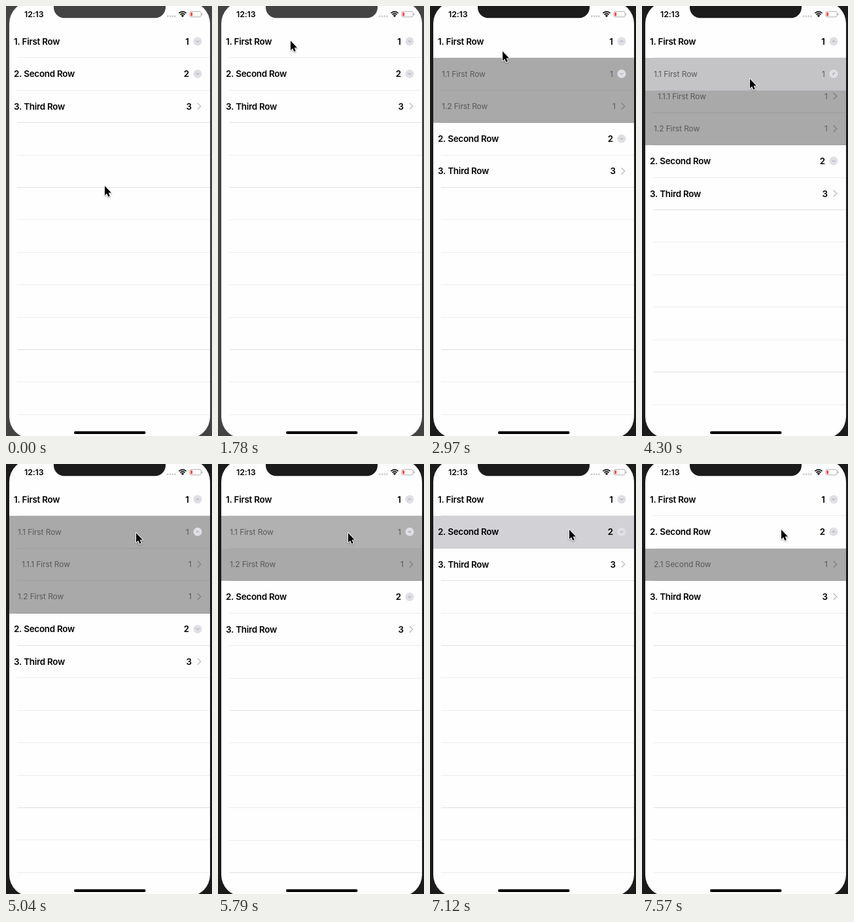
Recreate the animation shown at these times as an HTML page with a canvas. Size 315x655 px, loop 8 s.

```html
<!DOCTYPE html>
<html lang="en">
<head>
<meta charset="utf-8">
<title>Expandable rows</title>
<style>
  html, body { margin: 0; width: 100%; height: 100%; overflow: hidden; background: #1b1b1b; }
  canvas { display: block; width: 315px; height: 655px; }
</style>
</head>
<body>
<canvas id="stage" width="315" height="655"></canvas>
<script>
const ctx = document.getElementById('stage').getContext('2d');
const LOOP = 8000, STEP = 148.4;
const TOP = 29.1, ROW = 49.42, LEFT = 5, RIGHT = 312;
const FONT = 'Inter, "Liberation Sans", sans-serif';

const row = (id, name, value, kids = []) => ({ id, label: id + ' ' + name, value, kids });
const tree = [
  row('1.', 'First Row', 1, [
    row('1.1', 'First Row', 1, [row('1.1.1', 'First Row', 1)]),
    row('1.2', 'First Row', 1)
  ]),
  row('2.', 'Second Row', 2, [row('2.1', 'Second Row', 1)]),
  row('3.', 'Third Row', 3)
];

// time, row, opens
const taps = [
  [1990, '1.', true],
  [4115, '1.1', true],
  [5500, '1.1', false],
  [6320, '1.', false],
  [7190, '2.', true]
];

// time, x, y of the pointer tip
const path = [
  [0, 151, 274], [594, 151, 274], [890, 122, 156], [1039, 122, 156],
  [1780, 111, 53], [2820, 111, 54], [2968, 111, 69], [3413, 135, 202],
  [3562, 135, 202], [4007, 165, 111], [4600, 165, 111], [5045, 199, 105],
  [5788, 199, 105], [6233, 210, 50], [6678, 210, 50], [7123, 213, 100], [LOOP, 213, 100]
];

const clamp = v => Math.max(0, Math.min(1, v));
const ease = v => { v = clamp(v); return v * v * (3 - 2 * v); };
const pixel = y => Math.floor(y + 0.25);

function openness(id, t) {
  let p = 0;
  for (const [start, target, opens] of taps) {
    if (target !== id || t < start) continue;
    const e = ease((t - start) / 300);
    p = opens ? e : 1 - e;
  }
  return p;
}

function highlight(id, t) {
  for (const [start, target] of taps) {
    if (target === id && t >= start - 100 && t < start + 330) return 1 - clamp((t - start - 120) / 210);
  }
  return 0;
}

function fill(color, x, y, w, h) {
  ctx.fillStyle = color;
  ctx.fillRect(x, y, w, h);
}

function pill(color, x, y, w, h, r) {
  ctx.fillStyle = color;
  ctx.beginPath();
  ctx.roundRect(x, y, w, h, r);
  ctx.fill();
}

function stroke(color, width, points) {
  ctx.strokeStyle = color;
  ctx.lineWidth = width;
  ctx.beginPath();
  points.forEach(([x, y]) => ctx.lineTo(x, y));
  ctx.stroke();
}

function write(text, x, y, font, color, spacing, align = 'left') {
  ctx.font = font + ' ' + FONT;
  ctx.letterSpacing = spacing + 'px';
  ctx.textAlign = align;
  ctx.fillStyle = color;
  ctx.fillText(text, x, y);
}

function separator(y) {
  const f = y - Math.floor(y);
  fill(f > 0.15 && f < 0.42 ? '#e0e0e0' : '#ededed', 17, pixel(y), RIGHT - 17, 1);
}

function drawCell(r, y, depth, t) {
  const y0 = pixel(y) + 1, y1 = pixel(y + ROW) + 1, mid = y + ROW / 2;
  fill(depth ? '#a9a9a9' : '#fefefe', LEFT, y0, RIGHT - LEFT, y1 - y0);
  if (depth) fill('#9c9c9c', 17, y1 - 1, RIGHT - 17, 1);
  else separator(y + ROW);
  const lit = highlight(r.id, t);
  if (lit) fill(`rgba(209,209,214,${lit})`, LEFT, y0, RIGHT - LEFT, y1 - y0);

  const font = depth ? '400 12px' : '600 13.4px';
  const color = depth ? '#5a5a5a' : '#000';
  const spacing = depth ? -0.1 : -0.25;
  const base = mid + (depth ? 4.3 : 5);
  write(r.label, 12 + depth * 6, base, font, color, spacing);
  write(r.value, r.kids.length ? 280 : 284, base, font, color, 0, 'right');

  if (!r.kids.length) {
    stroke(depth ? '#7c7c7e' : '#b8b8bc', 1.3, [[292.7, mid - 5], [297.7, mid], [292.7, mid + 5]]);
    return;
  }
  ctx.save();
  ctx.translate(293, mid);
  pill('#dfdfe5', -6.5, -6.5, 13, 13, 6.5);
  ctx.rotate(Math.PI * openness(r.id, t));
  stroke('#9b9ba3', 1, [[-2.3, -0.9], [0, 1], [2.3, -0.9]]);
  ctx.restore();
}

const height = (r, t) => ROW + openness(r.id, t) * r.kids.reduce((s, k) => s + height(k, t), 0);

function drawRow(r, y, depth, t) {
  const p = openness(r.id, t), end = y + height(r, t);
  if (p > 0) {
    ctx.save();
    ctx.beginPath();
    const clipTop = pixel(y + ROW) + 1;
    ctx.rect(LEFT, clipTop, RIGHT - LEFT, pixel(end) + 1 - clipTop);
    ctx.clip();
    let ky = y + ROW;
    r.kids.forEach((k, i) => {
      const last = i === r.kids.length - 1;
      const at = last ? ky - ROW * (1 - p) : ky;
      // the last child slides out over its sibling
      if (i > 0) ctx.globalAlpha = 0.5 + 0.5 * p;
      drawRow(k, at, depth + 1, t);
      if (i > 0 && p < 1) fill('#858585', LEFT, pixel(at), RIGHT - LEFT, 1);
      ky += height(k, t);
    });
    ctx.restore();
  }
  drawCell(r, y, depth, t);
  return end;
}

function drawStatus(frame) {
  pill(frame, 73, -30, 171, 48.3, 16);
  write('12:13', 28, 17, '600 12.4px', '#000', -0.1);
  for (let i = 0; i < 4; i++) pill('#cbcbcb', 246 + i * 3.7, 14.3, 2.6, 2.6, 1.2);

  ctx.strokeStyle = '#000';
  ctx.lineWidth = 1.7;
  for (const r of [5, 7.9]) {
    ctx.beginPath();
    ctx.arc(270, 16.6, r, -Math.PI * 0.75, -Math.PI * 0.25);
    ctx.stroke();
  }
  ctx.fillStyle = '#000';
  ctx.beginPath();
  ctx.moveTo(270, 17);
  ctx.arc(270, 17, 3.2, -Math.PI * 0.75, -Math.PI * 0.25);
  ctx.fill();

  ctx.strokeStyle = '#b0a6a6';
  ctx.lineWidth = 0.9;
  ctx.beginPath();
  ctx.roundRect(281, 8.3, 17.2, 8.4, 2.3);
  ctx.stroke();
  pill('#f5453a', 282.3, 9.7, 2.8, 5.6, 0.9);
  pill('#b0a6a6', 299, 11, 1.2, 3, 0.6);
}

function drawPointer(t) {
  const i = path.findIndex(k => k[0] > t);
  const [t0, x0, y0] = path[i - 1], [t1, x1, y1] = path[i];
  const e = ease((t - t0) / (t1 - t0));
  ctx.save();
  ctx.translate(x0 + (x1 - x0) * e, y0 + (y1 - y0) * e);
  ctx.beginPath();
  [[0, 0], [0, 14.4], [3.2, 11.5], [5.4, 16.6], [7.8, 15.6], [5.7, 10.6], [10, 10.6]]
    .forEach(([x, y]) => ctx.lineTo(x, y));
  ctx.closePath();
  ctx.lineJoin = 'round';
  ctx.shadowColor = 'rgba(0,0,0,.35)';
  ctx.shadowBlur = 2;
  ctx.shadowOffsetY = 1;
  ctx.strokeStyle = '#fff';
  ctx.lineWidth = 2;
  ctx.stroke();
  ctx.shadowColor = 'transparent';
  ctx.fillStyle = '#000';
  ctx.fill();
  ctx.restore();
}

function draw(t) {
  const frame = t < 1890 ? '#434343' : '#1b1b1b';
  fill(frame, 0, 0, 315, 655);
  ctx.save();
  ctx.beginPath();
  ctx.roundRect(LEFT, -6.4, RIGHT - LEFT, 665, 33);
  ctx.clip();
  fill('#fefefe', 0, 0, 315, 655);
  let y = TOP;
  for (const r of tree) y = drawRow(r, y, 0, t);
  for (y += ROW; y < 630; y += ROW) separator(y);
  drawStatus(frame);
  pill('#000', 104, 647.8, 109.5, 4.2, 2.1);
  ctx.restore();
  drawPointer(t);
}

function tick() {
  const t = performance.now() % LOOP;
  draw(Math.floor((t + 8) / STEP) * STEP);
  requestAnimationFrame(tick);
}
tick();
</script>
</body>
</html>
```
